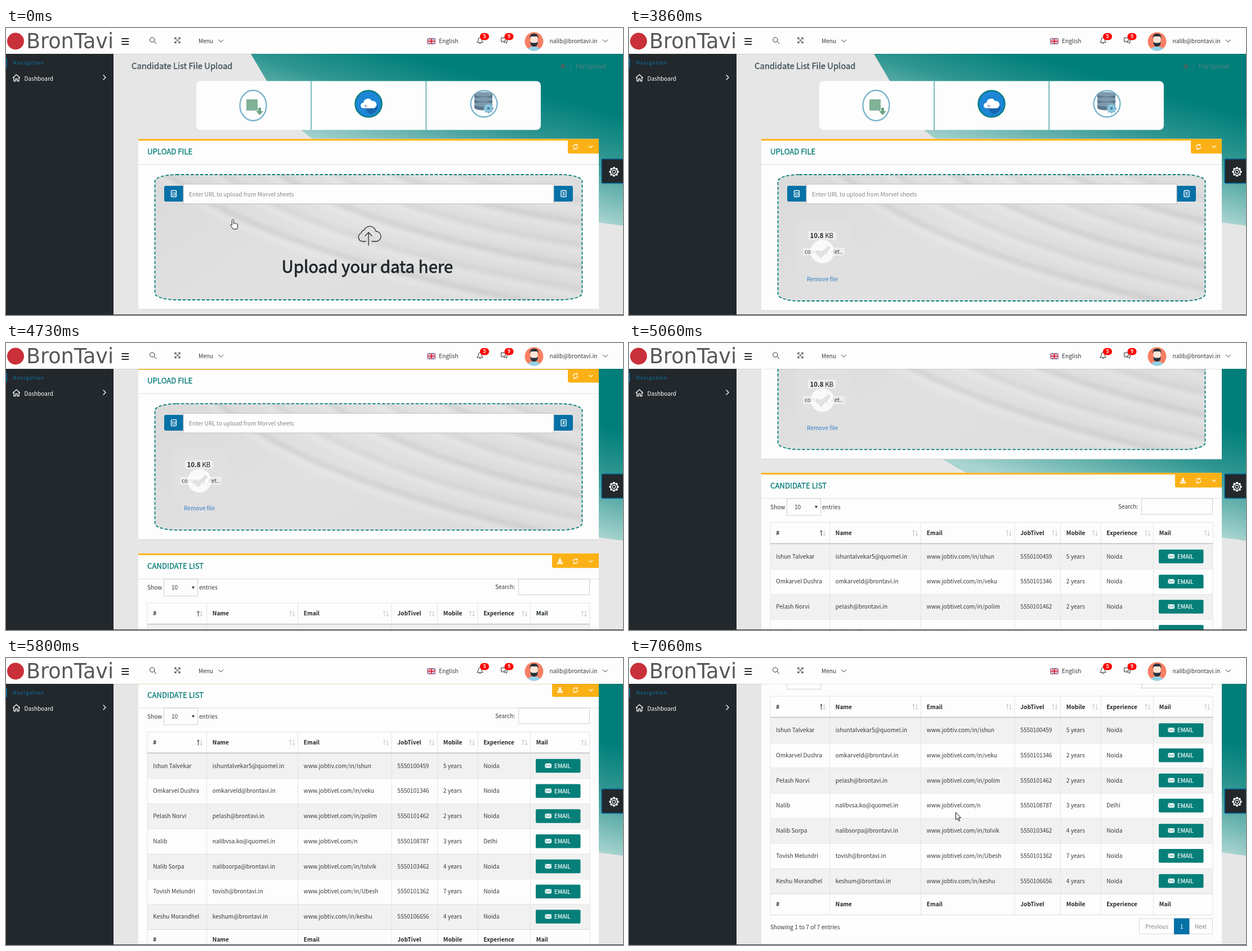
An HTML page that plays this animation: 1096 by 511 pixels, repeating every 7.12 s.

```html
<!DOCTYPE html>
<html lang="en">
<head>
<meta charset="utf-8">
<title>Candidate upload</title>
<style>
  html, body { margin: 0; width: 100%; height: 100%; overflow: hidden; background: #e6e6e6; }
  svg { display: block; width: 100%; height: 100%; }
  text { font: 10.15px "Noto Sans CJK JP", "Noto Sans CJK SC", "Noto Sans CJK", "Open Sans", sans-serif; fill: #333a3e; white-space: pre; }
  .line { fill: none; stroke: #2a2a2a; stroke-width: 1; stroke-linecap: round; stroke-linejoin: round; }
  .white { stroke: #fff; stroke-width: 1.3; }
  .bars { stroke-width: 1.8; }
  .bold { font-weight: 700; fill: #20262a; }
  .title { font-size: 14.75px; fill: #3e5059; stroke: #3e5059; stroke-width: .35px; }
  .head { font-size: 13.2px; fill: #067d78; stroke: #067d78; stroke-width: .3px; }
  .big { font-size: 29.4px; fill: #20262a; stroke: #20262a; stroke-width: .8px; }
  .logo { font: 36.5px "DejaVu Sans", sans-serif; fill: #595656; }
  .nav { font-size: 8.7px; letter-spacing: 1.2px; fill: #0a78b0; }
  .badge { font-size: 8.5px; font-weight: 700; text-anchor: middle; }
  .size { font-size: 11.5px; fill: #222; }
  .file { font-size: 9.7px; }
  .light { fill: #fff; }
  .muted { fill: #84898d; }
  .crumb { fill: #5b7f80; }
  .link { fill: #337fc4; }
  .mail { fill: #fff; stroke: #fff; stroke-width: .2px; }
</style>
</head>
<body>
<svg id="stage" viewBox="0 0 1096 511" preserveAspectRatio="none"></svg>
<script>
const TEAL = '#067f79', AMBER = '#fbb116', BLUE = '#0571a6', DARK = '#22282c', PAPER = '#fdfdfd';
const LOOP = 7120, STEP = 1000 / 15, UPLOADED = 3000;

const text = (x, y, s, cls = '') => `<text x="${x}" y="${y}" class="${cls}">${s}</text>`;
const rect = (x, y, w, h, fill, more = '') => `<rect x="${x}" y="${y}" width="${w}" height="${h}" fill="${fill}" ${more}/>`;
const disc = (x, y, r, fill, more = '') => `<circle cx="${x}" cy="${y}" r="${r}" fill="${fill}" ${more}/>`;
const line = (d, cls = '', more = '') => `<path d="${d}" class="line ${cls}" ${more}/>`;
const shape = (d, fill, more = '') => `<path d="${d}" fill="${fill}" ${more}/>`;
const chevron = (x, y, cls = '', w = 4) => line(`M${x - w} ${y - w / 2}l${w} ${w}l${w} ${-w}`, cls);
const group = (body, more = '') => `<g ${more}>${body}</g>`;

const refresh = (x, y) => line(`M${x - 4} ${y}a4 4 0 0 1 7-2.6v-2m0 2h-2M${x + 4} ${y}a4 4 0 0 1-7 2.6v2m0-2h2`, 'white');
const download = (x, y) => shape(`M${x - 1.5} ${y - 5}h3v4h2.5l-4 4-4-4h2.5zM${x - 5} ${y + 2}h3l2 2 2-2h3v3h-10z`, '#fff');

function defs() {
  return `<defs>
    <linearGradient id="wash" gradientUnits="userSpaceOnUse" x1="41" y1="-144" x2="-12" y2="41">
      <stop offset="0" stop-color="#007f7a"/><stop offset=".4" stop-color="#2f9691"/><stop offset="1" stop-color="#a9d4d0"/>
    </linearGradient>
    <linearGradient id="cloth" x2="1" y2=".4">
      <stop offset="0" stop-color="#dadada"/><stop offset=".5" stop-color="#e1e1e1"/><stop offset="1" stop-color="#dcdcdc"/>
    </linearGradient>
    <filter id="soft" x="-10%" y="-30%" width="120%" height="160%"><feGaussianBlur stdDeviation="4"/></filter>
  </defs>`;
}

function backdrop() {
  return rect(0, 0, 1096, 511, '#e6e6e6') +
    shape('M435 46L497 152Q510 168 527 184Q560 212 600 231Q760 310 1096 352V46z', 'url(#wash)');
}

function steps() {
  const ring = 'stroke="#7cb5ca" stroke-width="2.4"';
  const cloud = 'M635 143a5 5 0 0 1 0-10a8 8 0 0 1 15-3a6.5 6.5 0 0 1 3 13z';
  const db = [118, 127, 136].map(y =>
    shape(`M832 ${y}v6a16 4.5 0 0 0 32 0v-6z`, '#5b778d') +
    `<ellipse cx="848" cy="${y}" rx="16" ry="4" fill="#7f99ac"/>`).join('');
  return rect(338, 94.5, 612, 87, PAPER, 'rx="8"') +
    rect(541.5, 94.5, 1.2, 87, '#27908a') + rect(745.5, 94.5, 1.2, 87, '#27908a') +
    `<ellipse cx="439" cy="138" rx="23.5" ry="27" fill="${PAPER}" ${ring}/>` +
    rect(427, 127, 20, 20, '#7fb296') + shape('M448 142h5v6h4l-6.5 7-6.5-7h4z', '#6aa583') +
    disc(644, 135, 23.5, '#1d86d6', 'stroke="#0b7d85" stroke-width="2.6"') +
    shape('M651 131l10 10a20 20 0 0 1-14 13l-11-11z', '#1667ae') +
    shape(cloud, '#fff') + line('M639 146v-9m-3 3l3-3 3 3', '', 'style="stroke:#6d8fae"') +
    disc(849, 135, 23.5, PAPER, ring) + db +
    disc(857, 143, 7.5, '#8fc7de', 'stroke="#7db4cc" stroke-width="3" stroke-dasharray="3 2"') + disc(857, 143, 2.5, '#4c85a5');
}

function pageTop() {
  return text(223, 73, 'Candidate List File Upload', 'title') +
    shape('M984 68l5-4.5 5 4.5h-1.5v4h-2.5v-3h-2v3h-2.5v-4z', '#8b4a4a', 'opacity=".55"') +
    text(1001, 72, '/', 'crumb') + text(1012, 72, 'File Upload', 'crumb') + steps();
}

function card(top, height, title, left, icons) {
  return rect(235, top + 1, 818, height, '#d3d3d3') + rect(235, top, 818, height, PAPER) +
    rect(235, top, 818, 3, AMBER) +
    shape(`M${left} ${top + 2}H1053V${top + 26}H${left + 3}q-3 0-3-3z`, AMBER) + icons +
    refresh(1011.5, top + 14) + chevron(1039, top + 14, 'white', 3) +
    text(251, top + 27.5, title, 'head') + rect(235, top + 45, 818, 1, '#dedede');
}

function folds(shift) {
  let out = '';
  for (let i = 0; i < 6; i++) {
    const x = 260 + shift + i * 95, end = 510 - i * 40;
    const d = dy => `M${x} ${235 + dy}Q${x + 150} ${395 - i * 20 + dy} 1050 ${end + dy}`;
    out += `<path d="${d(0)}" stroke="#999" stroke-width="7" opacity="${i % 2 ? .18 : .28}"/>` +
      `<path d="${d(14)}" stroke="#fff" stroke-width="9" opacity=".2"/>`;
  }
  return group(out, 'fill="none" filter="url(#soft)"');
}

function dropZone(done) {
  const h = done ? 225 : 223, id = done ? 'full' : 'empty';
  const box = `x="264.5" y="261" width="759" height="${h}" rx="38" ry="12"`;
  const sheet = (x, inner) => rect(x - 4.5, 289.5, 9, 11, 'none', 'rx="1" stroke="#fff" stroke-width="1.4"') + inner;
  return `<clipPath id="${id}"><rect ${box}/></clipPath>` +
    group(rect(264, 261, 760, h, 'url(#cloth)') + folds(done ? 90 : 0), `clip-path="url(#${id})"`) +
    `<rect ${box} fill="none" stroke="${TEAL}" stroke-width="1.8" stroke-dasharray="5.5 3"/>` +
    rect(281, 281, 36, 28, BLUE, 'rx="3"') + rect(971, 281, 36, 28, BLUE, 'rx="3"') +
    rect(315, 278, 658, 35, PAPER, 'stroke="#bcbcbc"') +
    sheet(298, rect(296, 293.5, 4.5, 4, 'none', 'stroke="#fff"')) +
    sheet(990.5, line('M989 292.5l3 5m0-5l-3 5', 'white')) +
    text(325, 299.5, 'Enter URL to upload from Morvel sheets', 'muted');
}

function preview() {
  return rect(295, 341, 100, 97, '#e2e2e2', 'rx="16" opacity=".7"') +
    rect(318, 362, 50, 15, '#fff', 'opacity=".4" rx="2"') + rect(309, 391, 74, 14, '#fff', 'opacity=".4" rx="2"') +
    `<text x="321.5" y="374" class="size"><tspan class="bold">10.8</tspan> KB</text>` +
    text(312, 401.5, 'company_det..', 'file') + text(316, 451, 'Remove file', 'link') +
    group(disc(343.5, 398, 21, '#fff', 'opacity=".8"') +
      shape('M332 400l4-4 5 5 13-13 4 4-17 17z', '#e2e2e2', 'stroke="#d0d0d0" stroke-width=".8"'), 'id="check"');
}

function uploadPrompt() {
  return line('M639 380h-7a8 8 0 0 1-1-15a6 6 0 0 1 5-5a11 11 0 0 1 21 2a9 9 0 0 1 0 18h-7M644 387v-23m-6 6l6-6 6 6', '', 'style="stroke-width:1.3"') +
    text(489.5, 436, 'Upload your data here', 'big');
}

const uploadCard = done =>
  card(197.5, done ? 305 : 303, 'UPLOAD FILE', 998, '') + dropZone(done) + (done ? preview() : uploadPrompt());

const columns = [251, 356.5, 518.5, 685, 766.5, 838, 931.5, 1037];
const headings = ['#', 'Name', 'Email', 'JobTivel', 'Mobile', 'Experience', 'Mail'];
const people = [
  ['Ishun Talvekar', 'ishuntalvekar5@quomel.in', 'www.jobtiv.com/in/ishun', '5550100459', '5 years', 'Noida'],
  ['Omkarvel Dushra', 'omkarveld@brontavi.in', 'www.jobtivel.com/in/veku', '5550101346', '2 years', 'Noida'],
  ['Pelash Norvi', 'pelash@brontavi.in', 'www.jobtivel.com/in/polim', '5550101462', '2 years', 'Noida'],
  ['Nalib', 'nalibvsa.ko@quomel.in', 'www.jobtivel.com/n', '5550108787', '3 years', 'Delhi'],
  ['Nalib Sorpa', 'nalibsorpa@brontavi.in', 'www.jobtivel.com/in/tolvik', '5550103462', '4 years', 'Noida'],
  ['Tovish Melundri', 'tovish@brontavi.in', 'www.jobtivel.com/in/Ubesh', '5550101362', '7 years', 'Noida'],
  ['Keshu Morandhel', 'keshum@brontavi.in', 'www.jobtiv.com/in/keshu', '5550106656', '4 years', 'Noida'],
];

const cells = (values, y, cls) => values.map((v, i) => text(columns[i] + 10.3, y, v, cls)).join('');

function sortArrows(x, y, active) {
  const up = `M${x - 16} ${y + 4.5}v-9m-2 2l2-2 2 2`, down = `M${x - 10.5} ${y - 4.5}v9m-2-2l2 2 2-2`;
  const style = c => `style="stroke:${c}"`;
  return line(up, '', style(active ? '#333' : '#c4c4c4')) + line(down, '', style('#c4c4c4'));
}

function emailButton(y) {
  return rect(941, y - 12, 79.5, 24.5, TEAL, 'rx="2"') +
    rect(957.5, y - 4, 11.5, 8, '#fff', 'rx="1"') +
    line(`M958 ${y - 3}l5.2 4 5.2-4M958 ${y + 3.5}l3.5-3.5m7 3.5l-3.5-3.5`, '', `style="stroke:${TEAL};stroke-width:.8"`) +
    text(974, y + 4, 'EMAIL', 'mail');
}

function candidateCard() {
  const pitch = 44.75, bodyTop = 357.5, bodyEnd = bodyTop + pitch * people.length, tableEnd = bodyEnd + 37.5;
  const rows = people.map((p, i) => {
    const top = bodyTop + i * pitch;
    return (i % 2 ? '' : rect(251, top, 786, pitch, '#f1f1f1')) + rect(251, top, 786, 1, '#e5e5e5') +
      cells(p, top + 26.2, '') + emailButton(top + 22.3);
  }).join('');
  const rules = columns.map(x => rect(x - .5, 319.5, 1, tableEnd - 319.5, '#e3e3e3')).join('');
  return card(231.2, 600, 'CANDIDATE LIST', 970, download(984, 245)) +
    text(251, 296, 'Show') + rect(280.5, 277, 60, 30, PAPER, 'stroke="#cfcfcf"') + text(294, 296, '10') +
    shape('M330 290h5l-2.5 4.5z', '#333') + text(343, 296, 'entries') +
    text(869, 295, 'Search:') + rect(910.5, 277, 126, 28, PAPER, 'stroke="#cfcfcf"') +
    rect(251, 319, 786, 1, '#e3e3e3') + rows + rules +
    cells(headings, 342, 'bold') + columns.slice(1).map((x, i) => sortArrows(x + (i ? 3 : 1), 338.5, !i)).join('') +
    rect(251, 356.3, 786, 1.6, '#c6c6c6') +
    rect(251, bodyEnd, 786, 1, '#d2d2d2') + rect(251, tableEnd, 786, 1, '#d9d9d9') + cells(headings, bodyEnd + 22.3, 'bold') +
    text(251, 734, 'Showing 1 to 7 of 7 entries') +
    rect(906.5, 715.5, 130, 27.5, PAPER, 'stroke="#dadada"') + rect(968, 715, 27.5, 28.5, BLUE) +
    text(917, 733, 'Previous', 'muted') + text(979, 733, '1', 'light') + text(1005, 733, 'Next', 'muted');
}

function avatar() {
  return `<clipPath id="face"><circle cx="938" cy="24" r="16.5"/></clipPath>` +
    group(rect(921, 7, 34, 34, '#f77f63') + shape('M926 42q0-9 12-9t12 9z', '#8fd3ea') +
      rect(931.5, 12, 13, 20, '#fbe6d8', 'rx="6"') +
      shape('M930.5 19q-1-9 7.5-9t7.5 9l-2-4h-11z', '#25313b') +
      shape('M931.5 24l2.5 2.5h8l2.5-2.5v3q-1 6-6.5 6t-6.5-6z', '#25313b'),
      'clip-path="url(#face)"');
}

function header() {
  const badge = (x, n) => rect(x - 8, 9, 16, 12.5, '#f00', 'rx="6.2"') + text(x, 18.4, n, 'badge light');
  const cross = (d, color, width) => shape(d, 'none', `stroke="${color}" stroke-width="${width}"`);
  const diagonals = 'M748 18l15 11m0-11l-15 11', upright = 'M755.5 18v11M748 23.5h15';
  const flag = rect(748, 18, 15, 11, '#26337a') +
    cross(diagonals, '#fff', 2.2) + cross(diagonals, '#d0213c', .8) +
    cross(upright, '#fff', 4) + cross(upright, '#d0213c', 2.2);
  return rect(191, 0, 905, 47, '#000', 'opacity=".09"') + rect(0, 0, 1096, 46, PAPER) +
    disc(17, 23.5, 15, '#c9303a') + text(36, 36, 'BronTavi', 'logo') +
    line('M206 19h11.5M206 24h11.5M206 29h11.5', 'bars') +
    line('M264 21a4.2 4.2 0 1 1-8.4 0a4.2 4.2 0 1 1 8.4 0M263 24l4 4') +
    line('M300 17.5l9 9m0-9l-9 9M300 20v-2.5h2.5M306.5 17.5h2.5v2.5M309 24v2.5h-2.5M302.5 26.5h-2.5v-2.5') +
    text(342, 27, 'Menu') + chevron(381.5, 23) + flag + text(769, 27, 'English') +
    line('M837 25.5q2-2 2-4.5q0-4 3-4t3 4q0 2.5 2 4.5zM841 27.5h2') + badge(850, '5') +
    line('M880 17.5h7v6h-4l-2 2v-2h-1zM884 25.5h3l2 2v-2h1v-5') + badge(893.5, '9') +
    avatar() + text(965.5, 27, 'nalib@brontavi.in') + chevron(1064.5, 23);
}

function sidebar() {
  return rect(0, 46, 191, 465, DARK) + rect(0, 53, 1.6, 17, BLUE) + text(12.5, 65, 'Navigation', 'nav') +
    line('M12.5 88.5l6-5.5 6 5.5M14 88v6.5h3v-4h3v4h3v-6.5', 'white') +
    text(32.5, 93.7, 'Dashboard', 'light') + line('M173 84l4 4-4 4', 'white');
}

function settings() {
  let teeth = '';
  for (let i = 0; i < 8; i++) teeth += rect(1078, 247.5, 4, 4, '#fff', `rx="1" transform="rotate(${i * 45} 1080 256)"`);
  return rect(1058, 233, 42, 43.5, DARK, `rx="2" stroke="${BLUE}" stroke-width="1.5"`) + teeth +
    disc(1080, 256, 6.6, '#fff') + disc(1080, 256, 5.3, DARK) + disc(1080, 256, 2.8, DARK, 'stroke="#fff" stroke-width="1.2"');
}

function cursors() {
  const ink = 'stroke="#111" stroke-width="1" stroke-linejoin="round"';
  return group(shape('M4 1.5c0-2 3-2 3 0v5.5c.5-1 2.5-.8 2.7.4c.6-.8 2.2-.5 2.4.6c.8-.6 2-.1 2 1.2v3.3l-1.4 4.5h-6.7l-4.5-6c-1-1.6.8-2.6 2.5-1.2z', '#fff', ink), 'id="hand" transform="translate(397.5 341)"') +
    group(shape('M0 0v13l3-2.8 2.3 5 2-1-2.3-4.7h4z', '#fff', ink), 'id="arrow"');
}

const stage = document.getElementById('stage');
stage.innerHTML = defs() + backdrop() +
  group(pageTop() + group(uploadCard(false), 'id="before"') +
    group(uploadCard(true) + group(candidateCard(), 'transform="translate(0 296.3)"'), 'id="after"'), 'id="page"') +
  sidebar() + header() + settings() + rect(0, 510, 1096, 1, '#2b2f33') + cursors();

const [page, before, after, check, hand, arrow] =
  ['page', 'before', 'after', 'check', 'hand', 'arrow'].map(id => document.getElementById(id));

// step, scroll offset, pixels per step
const scrollKeys = [[63, 0, 0], [67, 46.5, 21], [76, 296.3, 24], [87, 484.3, 11], [97, 547.8, 0]];

function scrollAt(n) {
  const i = scrollKeys.findIndex(k => n < k[0]);
  if (i === 0) return 0;
  if (i < 0) return scrollKeys[scrollKeys.length - 1][1];
  const [n0, y0, v0] = scrollKeys[i - 1], [n1, y1, v1] = scrollKeys[i];
  const d = n1 - n0, u = (n - n0) / d, w = 1 - u;
  return y0 * w * w * (1 + 2 * u) + v0 * d * u * w * w + y1 * u * u * (3 - 2 * u) - v1 * d * u * u * w;
}

const progress = (t, from, to) => Math.min(1, Math.max(0, (t - from) / (to - from)));
const ease = u => u * u * (3 - 2 * u);
const show = (el, on) => el.setAttribute('display', on ? 'inline' : 'none');
const move = (el, x, y) => el.setAttribute('transform', `translate(${x.toFixed(2)} ${y.toFixed(2)})`);

function draw(step) {
  const t = step * STEP, done = t >= UPLOADED;
  show(before, !done);
  show(after, done);
  move(page, 0, -scrollAt(step));

  // The tick slides in, rests, then leaves upwards.
  const enter = 1 - (1 - progress(t, UPLOADED, 3900)) ** 3, leave = ease(progress(t, 5100, 6000));
  move(check, 0, 32 * (1 - enter) - 32 * leave);
  check.setAttribute('opacity', enter * (1 - leave));

  show(hand, !done);
  const out = ease(progress(t, UPLOADED, 3600)), back = ease(progress(t, 6600, 7000));
  show(arrow, done && (out < 1 || back > 0));
  if (back > 0) move(arrow, 1096 - 515.5 * back, 400 - 125 * back);
  else move(arrow, 403 + 693 * out, 341 - 190 * out);
}

const start = performance.now();
let last = -1;
function tick() {
  const t = (performance.now() - start) % LOOP;
  // A small lead keeps each step clear of its boundary.
  const step = Math.floor((t + 18) / STEP);
  if (step !== last) draw(last = step);
  requestAnimationFrame(tick);
}
tick();
</script>
</body>
</html>
```
